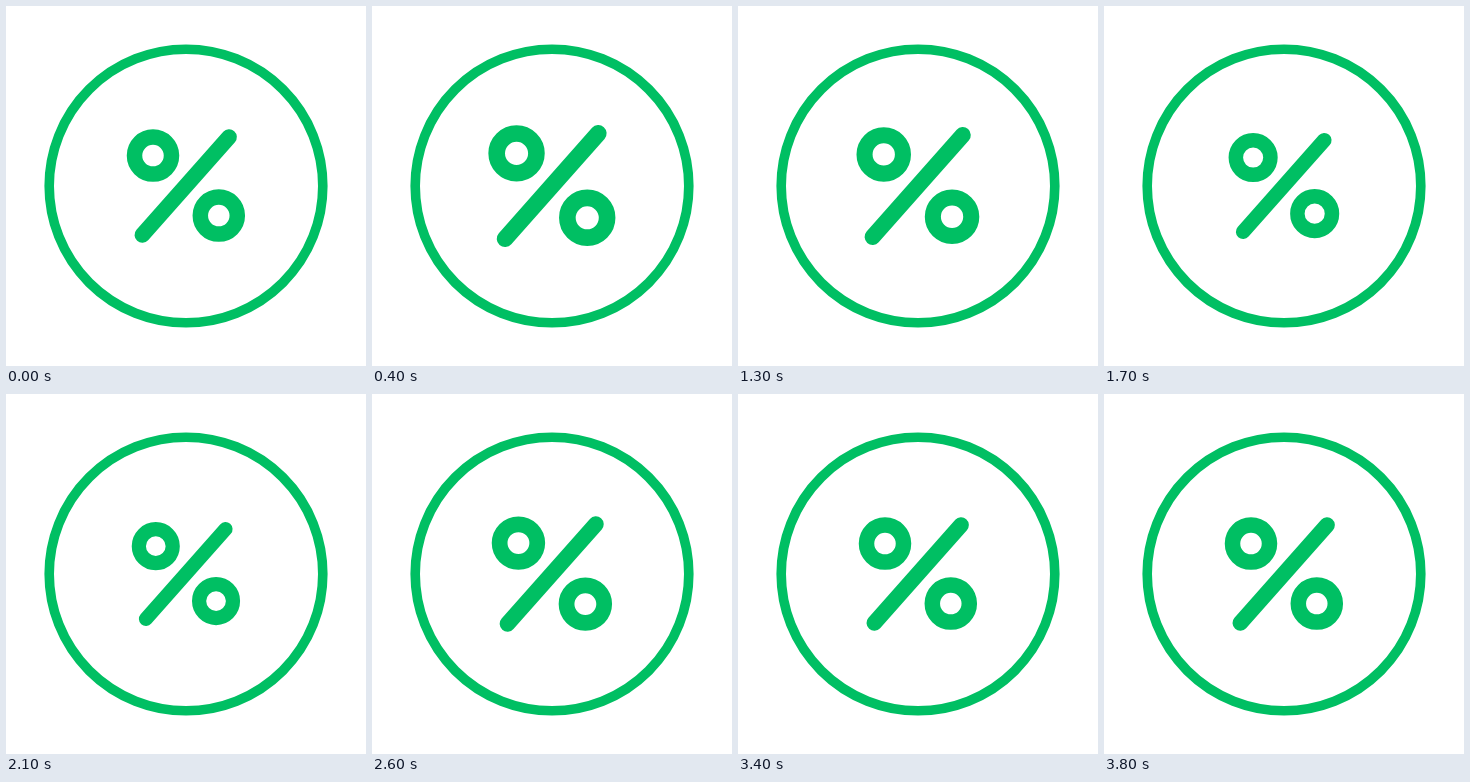
Animation of 360x360 px, one loop 5000 ms. Source, as an HTML page:

```html
<!DOCTYPE html>
<html lang="en">
<head>
<meta charset="utf-8">
<title>Pulsing percent sign</title>
<style>
  html, body { margin: 0; width: 100%; height: 100%; overflow: hidden; background: #fff; }
  svg { display: block; width: 100%; height: 100%; }
  .line { fill: none; stroke: #00bf63; stroke-linecap: round; }
</style>
</head>
<body>
<svg viewBox="0 0 360 360">
  <circle class="line" cx="180" cy="180" r="136.8" stroke-width="9.6"/>
  <g id="sign" class="line" stroke-width="15.5" transform="translate(180 179.8)">
    <circle cx="-33" cy="-30.2" r="18.5"/>
    <circle cx="32.8" cy="29.8" r="18.5"/>
    <path d="M-43.7 49.2L43.1-48.8"/>
  </g>
</svg>
<script>
  const LOOP = 5000, STEP = 100, END = 3800;
  // [time, scale]
  const keys = [[0, 1], [750, 1.135], [1980, 0.905], [2600, 1.017], [3000, 1], [END, 1]];
  const sign = document.getElementById('sign');
  const ease = u => u * u * (3 - 2 * u);

  function scaleAt(t) {
    const i = keys.findIndex(k => k[0] >= t);
    if (i < 1) return 1;
    const [t0, s0] = keys[i - 1], [t1, s1] = keys[i];
    return s0 + (s1 - s0) * ease((t - t0) / (t1 - t0));
  }

  function draw() {
    const now = performance.now() % LOOP;
    const t = Math.min(END, Math.floor(now / STEP) * STEP);
    sign.setAttribute('transform', `translate(180 179.8) scale(${scaleAt(t)})`);
    requestAnimationFrame(draw);
  }
  draw();
</script>
</body>
</html>
```
